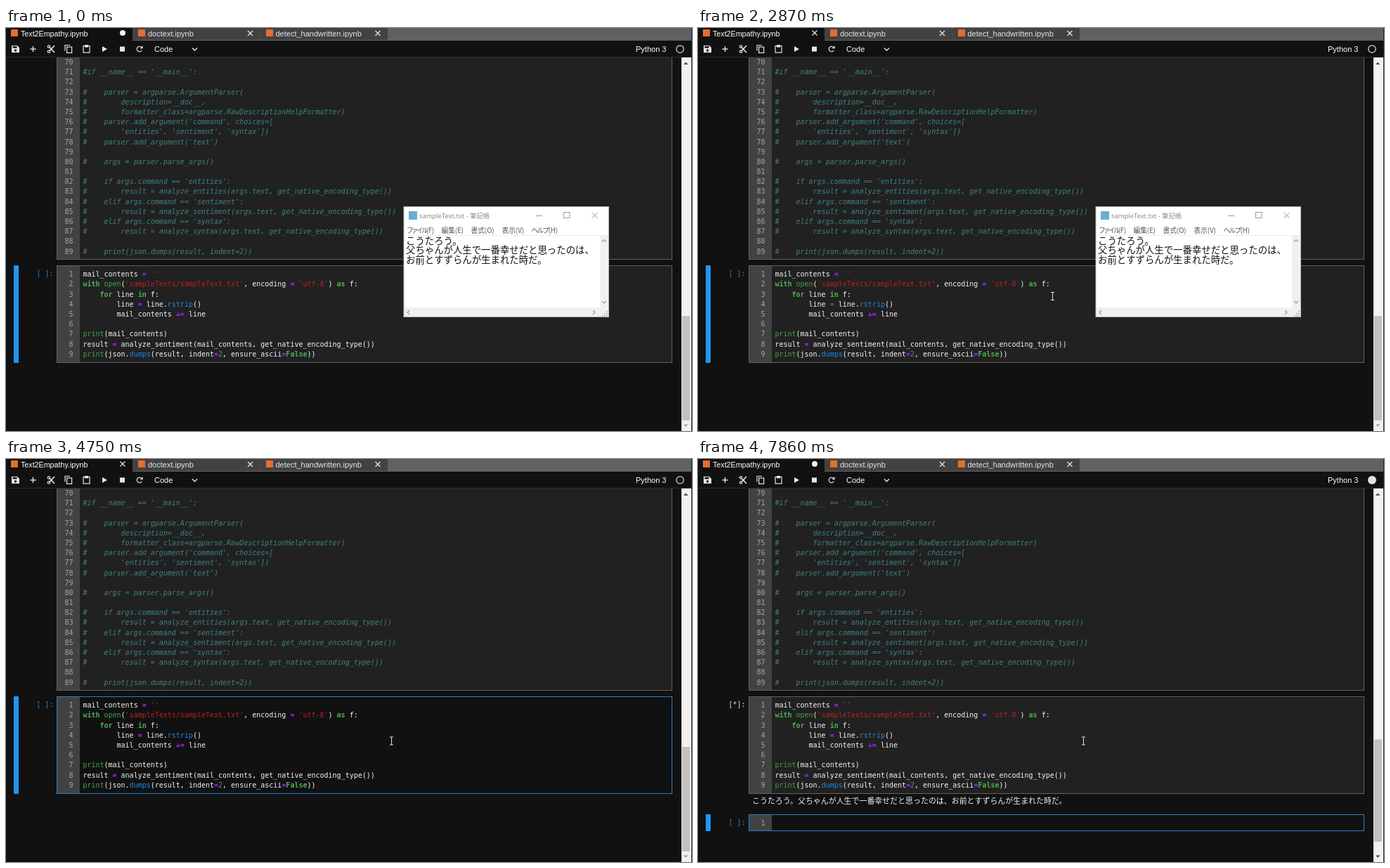
An HTML page with a canvas that plays this animation: 976x574 px, repeating every 8000 ms.

```html
<!DOCTYPE html>
<html lang="ja">
<head>
<meta charset="utf-8">
<title>Notebook demo</title>
<style>
html, body { margin: 0; width: 100%; height: 100%; overflow: hidden; background: #111; }
canvas { display: block; }
</style>
</head>
<body>
<canvas id="stage" width="976" height="574"></canvas>
<script>
const ctx = document.getElementById('stage').getContext('2d');
const LOOP = 8000, CHAR = 6.02, LINE = 14.19, CODE_X = 109.4;
const MONO = '10px "DejaVu Sans Mono", monospace';
const UI = '11px "Liberation Sans", Arial, sans-serif';
const CJK = '"Noto Sans CJK JP", "Noto Sans CJK", sans-serif';
const BLUE = '#2196f3', LIGHT = '#e6e6e6', ORANGE = '#e46e2e';

const message = ['こうたろう。', '父ちゃんが人生で一番幸せだと思ったのは、', 'お前とすずらんが生まれた時だ。'];

const comments = `
#if __name__ == '__main__':

#    parser = argparse.ArgumentParser(
#        description=__doc__,
#        formatter_class=argparse.RawDescriptionHelpFormatter)
#    parser.add_argument('command', choices=[
#        'entities', 'sentiment', 'syntax'])
#    parser.add_argument('text')

#    args = parser.parse_args()

#    if args.command == 'entities':
#        result = analyze_entities(args.text, get_native_encoding_type())
#    elif args.command == 'sentiment':
#        result = analyze_sentiment(args.text, get_native_encoding_type())
#    elif args.command == 'syntax':
#        result = analyze_syntax(args.text, get_native_encoding_type())

#    print(json.dumps(result, indent=2))`.split('\n');

const code = `mail_contents = ''
with open('sampleTexts/sampleText.txt', encoding = 'utf-8') as f:
    for line in f:
        line = line.rstrip()
        mail_contents += line

print(mail_contents)
result = analyze_sentiment(mail_contents, get_native_encoding_type())
print(json.dumps(result, indent=2, ensure_ascii=False))`.split('\n');

const tokenRules = [
  [/^'/, '#ba2121', ''],
  [/^(with|as|for|in|False)$/, '#4caf50', 'bold '],
  [/^(open|print|\d)$/, '#43a047', ''],
  [/^(rstrip|dumps)$/, '#1e88e5', ''],
  [/^\+?=$/, '#aa22ff', 'bold '],
  [/./, '#f4f4f4', '']
];

function rect(x, y, w, h, color) {
  ctx.fillStyle = color;
  ctx.fillRect(x, y, w, h);
}

function frame(x, y, w, h, color, width = 1) {
  ctx.strokeStyle = color;
  ctx.lineWidth = width;
  ctx.strokeRect(x, y, w, h);
}

function text(s, x, y, color, font, spacing = 0) {
  ctx.font = font;
  ctx.fillStyle = color;
  ctx.letterSpacing = spacing + 'px';
  ctx.fillText(s, x, y);
}

function line(points, color, width = 1) {
  ctx.beginPath();
  points.forEach(([x, y]) => ctx.lineTo(x, y));
  ctx.strokeStyle = color;
  ctx.lineWidth = width;
  ctx.stroke();
}

function shape(points, color) {
  ctx.beginPath();
  points.forEach(([x, y]) => ctx.lineTo(x, y));
  ctx.closePath();
  ctx.fillStyle = color;
  ctx.fill();
}

function disc(x, y, r, color) {
  ctx.beginPath();
  ctx.arc(x, y, r, 0, 7);
  ctx.fillStyle = color;
  ctx.fill();
}

function ring(x, y, r, color, width = 1, from = 0, to = Math.PI * 2) {
  ctx.beginPath();
  ctx.arc(x, y, r, from, to);
  ctx.strokeStyle = color;
  ctx.lineWidth = width;
  ctx.stroke();
}

function cross(x, y, r, color, width) {
  line([[x - r, y - r], [x + r, y + r]], color, width);
  line([[x + r, y - r], [x - r, y + r]], color, width);
}

function highlight(source, y) {
  for (const match of source.matchAll(/'[^']*'|\w+|\+?=|[^\s\w'=]/g)) {
    const [, color, weight] = tokenRules.find(rule => rule[0].test(match[0]));
    text(match[0], CODE_X + match.index * CHAR, y, color, weight + MONO);
  }
}

function cell(top, bottom, focused) {
  rect(72, top, 876, bottom - top, focused ? '#111' : '#212121');
  rect(73, top, 32, bottom - top, '#424242');
  frame(72.5, top + .5, 875, bottom - top - 1, focused ? '#2381d2' : '#616161');
}

function lineNumber(n, y) {
  text(String(n), 95.6 - String(n).length * CHAR, y, '#a5a5a5', MONO);
}

function prompt(s, y, color) {
  text(s, 43.5, y, color, MONO);
}

function selection(top, bottom) {
  ctx.beginPath();
  ctx.roundRect(11, top, 7, bottom - top, 1);
  ctx.fillStyle = BLUE;
  ctx.fill();
}

function tabs(dirty) {
  rect(0, 0, 976, 18, '#616161');
  rect(0, 0, 180, 18, '#111');
  rect(180, 0, 363, 17, '#424242');
  rect(361, 0, 1, 17, '#4c4c4c');
  [7, 188, 370].forEach(x => rect(x, 2, 10, 10, ORANGE));
  text('Text2Empathy.ipynb', 21, 11.5, '#fff', UI.replace('11', '10.7'));
  text('doctext.ipynb', 202, 12, LIGHT, UI);
  text('detect_handwritten.ipynb', 383.5, 12, LIGHT, UI);
  if (dirty) disc(166, 7, 4, '#f4f4f4');
  else cross(166, 7, 3.5, LIGHT, 1.3);
  [347.5, 529].forEach(x => cross(x, 7.5, 3.5, LIGHT, 1.3));
}

function toolbar(busy) {
  const c = LIGHT;
  rect(0, 18, 976, 24, '#111');
  rect(0, 41, 976, 1, '#2c2c2c');
  shape([[8, 25], [16, 25], [19, 28], [19, 35], [8, 35]], c);
  rect(9.5, 26, 6, 2.5, '#111');
  disc(13.5, 32, 1.7, '#111');
  line([[34.5, 30], [42.5, 30]], c, 1.4);
  line([[38.5, 26], [38.5, 34]], c, 1.4);
  ring(61, 26.5, 1.7, c, 1.3);
  ring(61, 33.5, 1.7, c, 1.3);
  line([[62.3, 27.7], [69, 35]], c, 1.6);
  line([[62.3, 32.3], [69, 25]], c, 1.6);
  line([[84, 32.5], [84, 24.5], [91, 24.5]], c, 1.2);
  frame(86.6, 27, 7, 8.4, c, 1.2);
  frame(110, 25.5, 9, 9.5, c, 1.2);
  rect(112, 24, 5, 3.5, c);
  shape([[137, 26], [144, 30], [137, 34]], c);
  rect(162, 26.5, 7, 7, c);
  ring(190, 30, 3.7, c, 1.3, .5, 5.4);
  shape([[190.5, 29.3], [194.6, 29.3], [194.6, 25.2]], c);
  text('Code', 211, 33.7, '#fff', UI);
  line([[265, 28.5], [268.5, 32], [272, 28.5]], c, 1.4);
  text('Python 3', 896, 33.7, '#fff', UI);
  if (busy) disc(959, 30, 6, '#e0e0e0');
  else ring(959, 30, 5.2, '#e0e0e0', 1.2);
}

function scrollbar(top, bottom, atEnd) {
  rect(961, 42, 14, 532, '#f1f1f1');
  rect(962, top, 11, bottom - top, '#c1c1c1');
  shape([[964, 52], [970.5, 52], [967.2, 48.5]], '#505050');
  shape([[964, 564.5], [970.5, 564.5], [967.2, 568]], atEnd ? '#a3a3a3' : '#505050');
}

function notepad() {
  const gray = '#999', menu = '9.7px ' + CJK;
  rect(566, 254, 292, 158, '#fff');
  frame(566, 254.5, 291.5, 157, '#b5b5b5');
  rect(573, 261, 12, 12, '#6aaed0');
  text('sampleText.txt - 筆記帳', 588, 270.7, '#8c8c8c', '9.4px "Noto Sans", ' + CJK);
  line([[754, 267.5], [763, 267.5]], gray);
  frame(793.5, 262.5, 8.5, 8, gray);
  cross(837.5, 267, 4, gray);
  text('ファイル', 570, 291.5, '#555', menu, -2.7);
  text('(F)', 597.5, 291.5, '#555', menu);
  text('編集(E)', 619.5, 291.5, '#555', menu);
  text('書式(O)', 661.5, 291.5, '#555', menu);
  text('表示(V)', 705.5, 291.5, '#555', menu);
  text('ヘルプ', 747.5, 291.5, '#555', menu, -1.8);
  text('(H)', 771.5, 291.5, '#555', menu);
  rect(567, 295, 290, 1, '#ececec');
  rect(845, 296, 12, 115, '#f0f0f0');
  rect(567, 398, 290, 13, '#f0f0f0');
  line([[848, 304.5], [851, 301.5], [854, 304.5]], gray, 1.2);
  line([[848, 389], [851, 392], [854, 389]], gray, 1.2);
  line([[574, 402], [571, 405], [574, 408]], gray, 1.2);
  line([[835, 402], [838, 405], [835, 408]], gray, 1.2);
  for (let i = 0; i < 3; i++)
    for (let j = 0; j <= i; j++) rect(854 - j * 3, 403 + i * 3, 1.6, 1.6, '#a8a8a8');
  message.forEach((s, i) => text(s, 569, 307.7 + i * 13.5, '#111', '13.4px ' + CJK));
}

// start, end, number of steps, from, to
const moves = [
  [660, 1420, 11, [908, 580], [678, 393]],
  [1500, 1730, 4, [678, 393], [609, 368.5]],
  [1960, 2200, 4, [609, 368.5], [617, 356]],
  [2350, 2870, 8, [617, 356], [503.5, 382]],
  [3590, 3820, 4, [503.5, 382], [547.5, 401.5]]
];

function pointerAt(t) {
  const move = moves.filter(m => t >= m[0]).pop();
  if (!move) return null;
  const [start, end, steps, from, to] = move;
  const step = Math.min(steps, Math.floor((t - start) / (end - start) * (steps - 1) + 1.001));
  const p = 1 - (1 - step / steps) ** 1.4;
  return from.map((v, i) => v + (to[i] - v) * p);
}

function pointer(x, y, noteOpen) {
  const overNote = noteOpen && x > 566 && x < 858 && y < 412;
  const isText = overNote ? x < 845 && y < 398 : x > 72 && x < 948 && y < 477;
  if (isText) {
    const c = overNote ? '#222' : '#e0e0e0';
    const px = Math.round(x) + .5;
    line([[px, y - 5.5], [px, y + 5.5]], c);
    [-5.5, 5.5].forEach(d => line([[px - 2.5, y + d], [px + 2.5, y + d]], c));
    return;
  }
  const arrow = [[0, 0], [0, 14], [3.2, 11], [5.5, 16], [7.7, 15], [5.5, 10.2], [10, 10]]
    .map(([a, b]) => [x + a, y + b]);
  shape(arrow, '#fff');
  line([...arrow, arrow[0]], '#000', .8);
}

function caretVisible(t) {
  const toggles = [3200, 3670, 4200, 4750, 5300, 5770, 6230, 6780, 7330, 7860];
  return toggles.filter(v => t >= v).length % 2 === 1;
}

function draw(t) {
  const running = t >= 5300, printed = t >= 5440;
  const noteOpen = t < 3120, focused = t >= 3200 && !running;
  rect(0, 0, 976, 574, '#111');

  cell(30, 330, false);
  comments.forEach((s, i) => {
    const y = 52 + i * LINE;
    lineNumber(70 + i, y);
    text(s, CODE_X, y, '#408080', 'italic ' + MONO);
  });

  cell(338, 477, focused);
  code.forEach((s, i) => {
    const y = 354.2 + i * LINE;
    lineNumber(i + 1, y);
    highlight(s, y);
  });
  prompt(running ? '[*]:' : '[ ]:', 353.2, running ? '#ddd' : '#307fc1');

  let caretX = 218, caretY = 371;
  if (running) {
    const top = printed ? 506 : 485;
    cell(top, top + 24, true);
    lineNumber(1, top + 16);
    prompt('[ ]:', top + 15, '#307fc1');
    selection(top, top + 24);
    caretX = 109;
    caretY = top + 5;
  } else selection(338, 477);
  if (printed) text(message.join(''), 77, 491.3, '#f0f0f0', '10.95px ' + CJK);
  if (caretVisible(t)) rect(caretX + .3, caretY, 1.4, 15, '#fff');

  tabs(t < 1580 || running);
  toolbar(running);
  if (printed) scrollbar(399.5, 545, false);
  else if (running) scrollbar(404, 550.5, false);
  else scrollbar(410, 559, true);
  rect(975, 0, 1, 574, '#222');

  if (noteOpen) notepad();
  if (t >= 3120 && t < 3290) disc(501.5, 381.5, 10.3, 'rgba(190,178,20,.85)');
  const at = pointerAt(t);
  if (at) pointer(at[0], at[1], noteOpen);
}

const begin = performance.now();
function tick() {
  draw((performance.now() - begin) % LOOP);
  requestAnimationFrame(tick);
}
tick();
</script>
</body>
</html>
```
